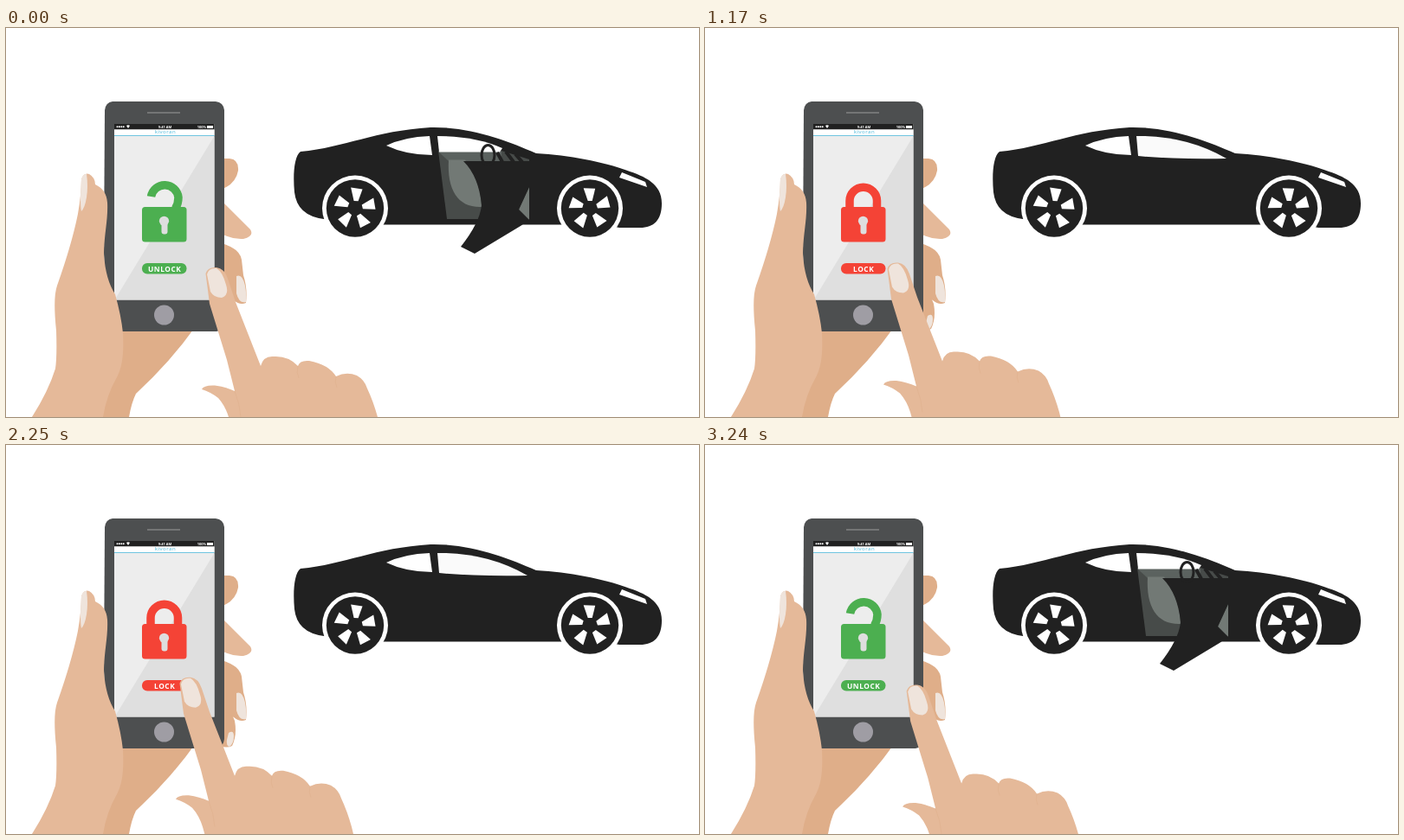
Write an HTML page that moves like this. It is 800 by 450 pixels and loops after 3.33 s.

```html
<!DOCTYPE html>
<html lang="en">
<head>
<meta charset="utf-8">
<title>Phone car lock</title>
<style>
  html, body { margin: 0; width: 100%; height: 100%; overflow: hidden; background: #fff; }
  svg { display: block; width: 800px; height: 450px; }
  text { font-family: "Open Sans", Arial, sans-serif; fill: #fff; text-anchor: middle; }
  .tiny { font-size: 4px; font-weight: 700; }
  .label { font-size: 8.4px; font-weight: 700; letter-spacing: .55px; }
  .skin { fill: #e5b999; }
  .shade { fill: #dfae89; }
  .nail { fill: #efe4dc; }
  .dark { fill: #212121; }
  .shackle { fill: none; stroke-width: 9.5; }
  .crease { fill: none; stroke: #dfb08d; stroke-width: .6; }
</style>
</head>
<body>
<svg viewBox="0 0 800 450">
  <defs>
    <path id="slot" d="M-6.5-23.500L7-22.500L3-8.500H-2Z" fill="#fff"/>
    <g id="spokes">
      <use href="#slot"/>
      <use href="#slot" transform="rotate(72)"/>
      <use href="#slot" transform="rotate(144)"/>
      <use href="#slot" transform="rotate(216)"/>
      <use href="#slot" transform="rotate(288)"/>
    </g>
    <g id="tyre">
      <circle r="38" fill="#fff"/>
      <circle r="33.2" class="dark"/>
    </g>
    <g id="keyhole" fill="#dedede">
      <circle cx="182.5" cy="223.3" r="5.6"/>
      <rect x="179.5" y="225" width="7" height="13.5" rx="3"/>
    </g>
  </defs>

  <!-- car -->
  <path class="dark" d="M340 143C392 138 425 119 490 115C536 114 578 130 612 145C650 147 690 155 716 164.500C738 172 757 180 757 203C757 222 748 231 732 231H708L690 227.500H420L367 221Q336 217 333 190C331 168 333 148 340 143Z"/>
  <path fill="#fff" d="M439 136Q460 126 489 125L492 147Q462 147 439 136ZM711 167L738 178L740 184L708 173Z"/>
  <path id="window" fill="#fafafa" d="M498 125Q555 124 602 151Q540 152 500 148Z"/>
  <g id="open">
    <path fill="#474b49" d="M499 142H572L604 152V221H509Z"/>
    <path fill="#5b625f" d="M499 143H572V154H511Z"/>
    <path fill="#fff" d="M498 125Q542 125 573 139L570 143.500H500Z"/>
    <path fill="#727975" d="M511 152.500H530Q549 180 549 207C522 208 509 188 511 152.500ZM592 210L604 184V222Z"/>
    <path class="dark" d="M528 154H604V184L592 210L604 222L594 229L541 261L525 253Q547 225 549 205Q546 172 528 154Z"/>
    <path fill="none" stroke="#212121" stroke-width="4" d="M567 144L573 155M577 143L586 155M588 146L596 155"/>
    <ellipse cx="556.500" cy="147" rx="7.500" ry="11.500" fill="none" stroke="#212121" stroke-width="3"/>
  </g>
  <use href="#tyre" x="403" y="208.500"/>
  <use href="#spokes" transform="translate(403 208.500) rotate(4)"/>
  <use href="#tyre" x="674" y="208.500"/>
  <use href="#spokes" transform="translate(674 208.500) rotate(-2)"/>

  <!-- fingers and palm behind the phone -->
  <g class="shade">
    <path d="M245 151H258Q269 152 268 165Q265 182 245 188Z"/>
    <path class="skin" d="M245 203H252L267 218L282 233Q287 241 274 244Q260 245 245 236Z"/>
    <path d="M245 300H256L264 319Q267 336 261 348Q256 351 245 348Z"/>
    <path d="M245 250H252Q270 256 272 268L274 286Q279 301 277 318Q270 321 263 315L245 305Z"/>
    <path d="M125 345H219Q190 386 150 423Q145 433 142 450H105Z"/>
  </g>
  <path class="nail" d="M266 287Q273 284 276 298Q278 309 277 317Q269 319 266 307ZM257 333Q263 329 263 337Q263 345 258 349Q254 348 255 341Z"/>

  <!-- phone -->
  <path fill="#4d4f50" d="M123 85H242Q251 86 252 95V340Q251 350 243 351H134Q114 330 113 260L114 95Q115 86 123 85Z"/>
  <path stroke="#9b9b9b" d="M163 98H201"/>
  <path fill="#ededed" d="M125 111H240.500V314.500H125Z"/>
  <path fill="#dfdfdf" d="M240.500 125V314.500H125.500Z"/>
  <path fill="#212121" d="M125 111H240.500V117.500H125Z"/>
  <path fill="#fff" d="M125 117.500H240.500V124H125Z"/>
  <path stroke="#6fc5e0" d="M125 124.500H240.500"/>
  <path stroke="#fff" stroke-width="2" stroke-linecap="round" stroke-dasharray="0 2.400" d="M128.500 114.300H138"/>
  <path fill="#fff" d="M139 113Q141 111.500 143 113L141 116ZM232 113H239V116H232Z"/>
  <text class="tiny" x="183.500" y="116">9:41 AM</text>
  <text class="tiny" x="226" y="116">100%</text>
  <text x="184" y="122.300" style="font-size:6px;letter-spacing:.5px;fill:#45b5d8">kivoran</text>
  <circle cx="182.500" cy="332" r="11.500" fill="#9f9da4"/>

  <g id="lock">
    <path id="shackle" class="shackle"/>
    <rect x="157" y="207" width="51.500" height="40.500" rx="3.500"/>
    <use href="#keyhole"/>
    <rect x="157" y="272" width="51.500" height="12.500" rx="6"/>
    <text id="label" class="label" x="183.200" y="281.500"></text>
  </g>

  <!-- holding hand -->
  <path class="skin" d="M30 450Q49 420 57 394Q59 380 58 350Q54 312 59 298Q76 250 83 215Q87 192 87 175Q90 167 96 169Q103 173 103 181Q116 187 117 202C118 222 113 240 113 262Q115 291 126 308Q133 333 135 353Q137 388 128 404Q116 425 112 450Z"/>
  <path class="nail" d="M87 175Q89 168 93 169Q95 183 93 196Q91 208 87 212Q85 202 87 175Z"/>

  <!-- tapping hand -->
  <g id="tap">
    <path class="skin" d="M230.500 284Q233 276 243 277Q252 278 256 290L265 317L294 391Q297 379 309 380Q326 379 337 391Q339 384 350 385Q372 389 381 403Q393 397 405 402Q414 407 417 417Q424 432 429 450L435 475H264L257 450Q253 437 245 428Q236 421 226 418Q228 413 241 413.500Q253 415 264 420L255 384L235 319Z"/>
    <path class="nail" d="M232 285Q234 277 243 278Q250 282 254 297Q258 309 249 312Q240 312 236 305Z"/>
    <path class="crease" d="M264 420Q270 435 271 450M337 391Q335 399 338 405M381 403Q379 410 382 416"/>
  </g>
</svg>
<script>
  const $ = id => document.getElementById(id);
  const STEP = 90, STEPS = 37;
  const LOCK_AT = 9, UNLOCK_AT = 28;
  const shackles = {
    LOCK: 'M167 209V200A15.700 15.700 0 0 1 198.500 200V209',
    UNLOCK: 'M167.500 195A15.900 15.900 0 0 1 199 196Q199 203 195.500 209'
  };

  // The finger approaches and leaves the button at a steady speed, twice per loop.
  function handShift(n) {
    const speed = n >= UNLOCK_AT ? 5.25 : 5;
    return -42.5 + speed * Math.min(Math.abs(n - 8.5), Math.abs(n - 27.5));
  }

  function draw(now) {
    const n = Math.floor(now / STEP) % STEPS;
    const locked = n >= LOCK_AT && n < UNLOCK_AT;
    const word = locked ? 'LOCK' : 'UNLOCK';
    const color = locked ? '#f44336' : '#4caf50';
    const x = handShift(n);

    $('tap').setAttribute('transform', `translate(${x} ${x * 0.275})`);
    $('window').style.display = locked ? '' : 'none';
    $('open').style.display = locked ? 'none' : '';
    $('lock').setAttribute('fill', color);
    $('shackle').setAttribute('stroke', color);
    $('shackle').setAttribute('d', shackles[word]);
    $('label').textContent = word;
  }

  const start = performance.now();
  function tick() {
    draw(performance.now() - start);
    requestAnimationFrame(tick);
  }
  tick();
</script>
</body>
</html>
```
